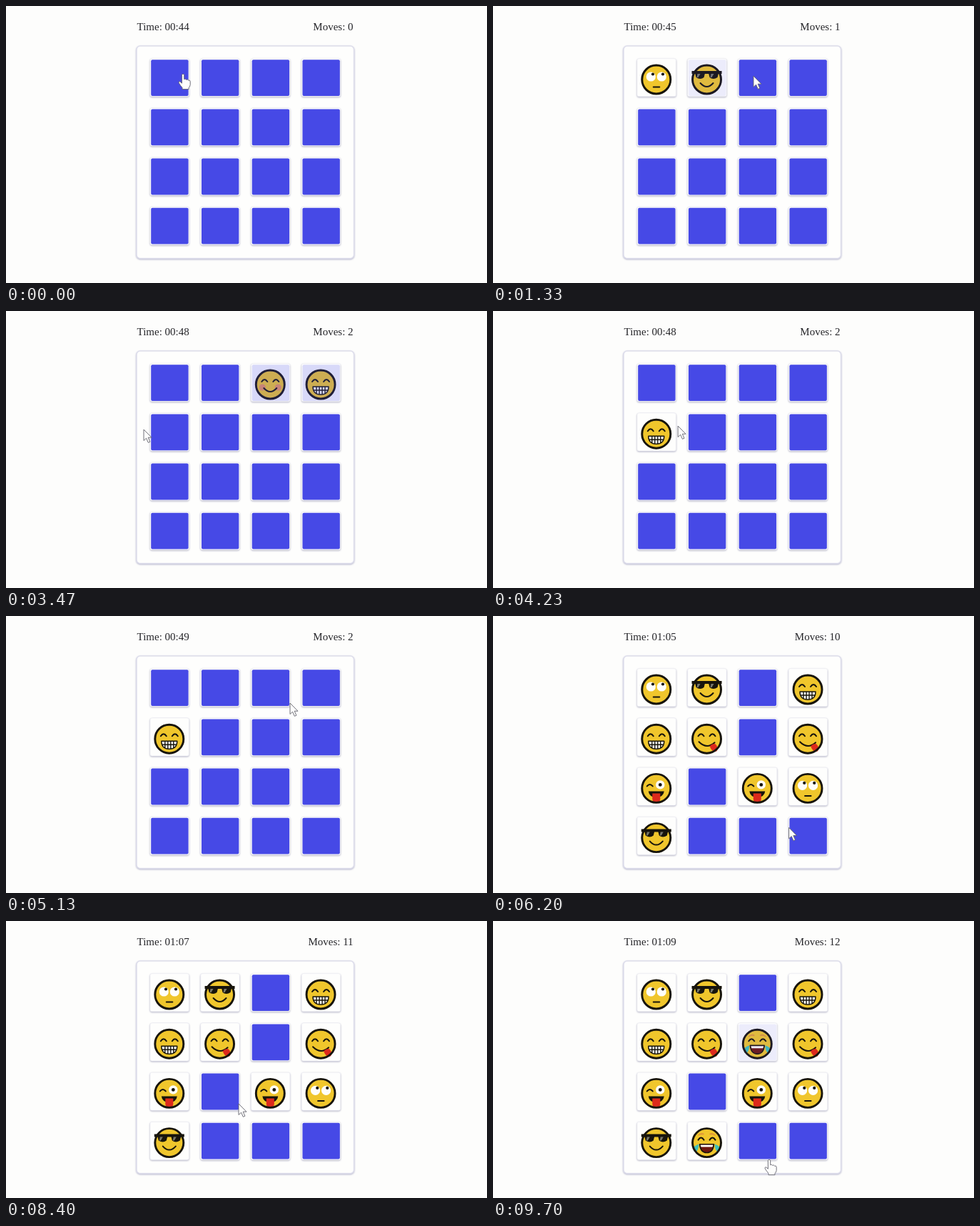
Recreate the animation shown at these times as an HTML page. Size 674 by 388 pixels, loop 9730 ms.

```html
<!DOCTYPE html>
<html lang="en">
<head>
<meta charset="utf-8">
<title>Memory game</title>
<style>
html, body { margin: 0; width: 100%; height: 100%; overflow: hidden; background: #fdfdfc; }
svg { display: block; width: 674px; height: 388px; }
text { font: 15px "Liberation Serif", serif; fill: #26262a; }
.board { fill: #fefefd; stroke: #dedeec; stroke-width: 1.5; filter: drop-shadow(0 1.3px 1.2px #b4b4cc); }
.card { fill: #fefefd; stroke: #ededf4; stroke-width: .6; filter: drop-shadow(0 1.2px 1.2px #b0b0c4); }
.line { fill: none; stroke: #17140c; stroke-width: 2; stroke-linecap: round; stroke-linejoin: round; }
.thin { stroke-width: 1.4; }
</style>
</head>
<body>
<svg viewBox="0 0 674 388">
  <rect width="674" height="388" fill="#fdfdfc"/>
  <text id="time" x="183.5" y="34"></text>
  <text id="moves" x="486.6" y="34" text-anchor="end"></text>
  <rect class="board" x="183" y="56" width="304.5" height="297.5" rx="5"/>
  <g id="cards"></g>
  <g id="cursor" fill="#fefefd" stroke="#62626c" stroke-width=".9" stroke-linejoin="round">
    <path id="arrow" d="M0 0V15.5L3.6 12.2L6.3 18.3L8.9 17.2L6.2 11.2H11Z"/>
    <path id="hand" d="M-1.6 1.2Q0 -1 1.7 1.2V7.6Q3.6 6.4 4.7 8.3Q6.6 7.2 7.6 9.1Q10 8.3 10.2 10.8V15.3Q9.6 18.3 8 19.6V21.6H-1V19.4Q-3.8 16.4 -5.8 12.7Q-6.4 10.6 -4.2 10.8L-1.6 13.2Z"/>
  </g>
</svg>
<script>
const LOOP = 9730, CUT = 6000, FADE = 300, WAIT = 820, LAG = 60;
const INK = '#17140c', WHITE = '#fefefa';
const $ = id => document.getElementById(id);

// Faces, drawn around (0, 0)
const line = (d, cls = '') => `<path class="line ${cls}" d="${d}"/>`;
const shape = (d, fill) => `<path d="${d}" fill="${fill}"/>`;
const dot = (x, y, r, fill) => `<circle cx="${x}" cy="${y}" r="${r}" fill="${fill}"/>`;
const both = part => part + `<g transform="scale(-1 1)">${part}</g>`;
const eyes = both(line('M4 -4Q8 -10 12 -4'));
const smile = line('M-9 5Q0 15 9 5');
const grin = 'M-11 3H11Q11 14 0 14Q-11 14 -11 3Z';
const laugh = 'M-10 2H10Q9 14 0 14Q-9 14 -10 2Z';

const faces = {
  roll: both(dot(7.5, -4, 6.6, WHITE)) + dot(-4.8, -7.5, 2.1, INK) + dot(9.2, -7.5, 2.1, INK) + line('M-4 10.5H4.5'),
  cool: shape('M-21 -12H21V-8H-21Z', INK) + both(shape('M2 -11H17L15 -3Q9 1 4 -3Z', INK)) +
    shape('M-13 -8H-9L-12 -3H-14ZM6 -8H10L7 -3H5Z', '#77776c') + smile,
  blush: both(dot(11, 4, 4.6, '#e8925c')) + eyes + smile,
  grin: eyes + shape(grin, WHITE) + line(grin + 'M-10 8H10M-6 3V12M-2 3V14M2 3V14M6 3V12', 'thin'),
  yum: eyes + line('M-11 4Q0 15 11 5') + shape('M4 10Q8 6 12 7Q17 12 14 17Q8 20 4 10Z', '#dc2a1c'),
  wink: line('M-13 -3Q-9 -8 -5 -3') + dot(5.5, -5, 6.2, WHITE) + dot(5.5, -5, 2.4, INK) +
    shape('M-11 4H11Q10 12 0 13Q-10 12 -11 4Z', INK) +
    shape('M-5.5 7H5.5V15Q5 20 0 20Q-5 20 -5.5 15Z', '#dc2a1c'),
  joy: both(shape('M4 -13Q9 -15 13 -10L11 -10Q8 -12 4 -11Z', '#e0963a')) + eyes +
    shape(laugh, '#6e1710') + shape('M-9 3H9L8 6H-8Z', WHITE) + line(laugh, 'thin') +
    both(shape('M11 2Q21 5 18 12Q12 15 11 2Z', '#3fc0bb'))
};
const deck = ['roll', 'cool', 'blush', 'grin', 'grin', 'yum', 'joy', 'yum',
  'wink', '', 'wink', 'roll', 'cool', 'joy', '', 'blush'];

const left = i => 202 + (i % 4) * 70.75;
const top_ = i => 73.8 + (i >> 2) * 69.2;
const center = i => [left(i) + 27, top_(i) + 26.5];

$('cards').innerHTML = deck.map((name, i) => {
  const face = name && dot(0, 0, 20, '#f0c62c') + faces[name] +
    `<circle r="20" fill="none" stroke="${INK}" stroke-width="2.9"/>`;
  return `<g transform="translate(${left(i)} ${top_(i)})">
    <rect class="card" width="54.4" height="53" rx="2.5"/>
    <g class="face" transform="translate(26.8 29.2)">${face}</g>
    <rect class="cover" x="1.2" y="1.4" width="52.4" height="50.8" rx="2" fill="#4649e6"/></g>`;
}).join('');
const covers = [...document.querySelectorAll('.cover')];
const fronts = [...document.querySelectorAll('.face')];

// Two stretches of play: clicks are [time, card], stops are [time, x, y]
const early = play({
  from: 0, seconds: 44, lead: 600, moves: 0, solved: [],
  clicks: [[300, 0], [1060, 1], [2050, 2], [2590, 3], [3900, 4], [5480, 3]],
  stops: [[0, 248, 95], [1330, 365, 98], [3470, 193, 166], [5130, 398, 122]]
});
const late = play({
  from: CUT, seconds: 65, lead: 450, moves: 10, solved: [0, 1, 3, 4, 5, 7, 8, 10, 11, 12],
  clicks: [[6500, 15], [7280, 6], [8750, 13], [9430, 6]],
  stops: [[CUT, 400, 290], [7230, 350, 156], [8400, 326, 256], [9700, 387, 334]]
});

// Every second click is a move; cards that differ close again after a wait
function play(scene) {
  scene.shows = scene.solved.map(card => ({ card, open: -FADE, close: Infinity }));
  scene.turns = [];
  scene.clicks.forEach(([t, card], n) => {
    scene.shows.push({ card, open: t, close: Infinity });
    if (n % 2 === 0) return;
    const pair = scene.shows.slice(-2);
    const match = deck[pair[0].card] === deck[card];
    if (!match) pair.forEach(s => { s.close = t + WAIT; });
    scene.turns.push({ t, end: match ? t : t + WAIT });
  });
  scene.path = scene.clicks.map(([t, card]) => [t, ...center(card)])
    .concat(scene.stops).sort((a, b) => a[0] - b[0]);
  return scene;
}

const clamp = v => Math.max(0, Math.min(1, v));
const pad = n => String(n).padStart(2, '0');

function shown(scene, card, t) {
  return Math.max(0, ...scene.shows.filter(s => s.card === card)
    .map(s => clamp((t - s.open) / FADE) - clamp((t - s.close) / FADE)));
}

function pointer({ path }, t) {
  const n = Math.max(0, path.findLastIndex(p => p[0] <= t));
  const a = path[n], b = path[n + 1] || a;
  const u = clamp((t - a[0]) / (b[0] - a[0] || 1)), e = u * u * (3 - 2 * u);
  return [a[1] + (b[1] - a[1]) * e, a[2] + (b[2] - a[2]) * e];
}

// The hand shows over a closed card unless the game waits for a pair to close
function canClick(scene, t) {
  if (scene.turns.some(m => t >= m.t && t < m.end)) return false;
  const [x, y] = pointer(scene, t);
  return deck.some((_, i) => {
    const [cx, cy] = center(i);
    return Math.abs(x - cx) < 25.2 && Math.abs(y - cy) < 25.2 && shown(scene, i, t) < .5;
  });
}

function draw(t) {
  const scene = t < CUT ? early : late;
  const s = scene.seconds + Math.floor((t - scene.from + scene.lead) / 1000);
  $('time').textContent = `Time: ${pad(Math.floor(s / 60))}:${pad(s % 60)}`;
  $('moves').textContent = `Moves: ${scene.moves + scene.turns.filter(m => m.t <= t).length}`;
  covers.forEach((cover, i) => {
    const v = shown(scene, i, t);
    cover.setAttribute('opacity', 1 - v);
    fronts[i].setAttribute('visibility', v > 0 ? 'visible' : 'hidden');
  });
  const hand = canClick(scene, t - LAG);
  $('cursor').setAttribute('transform', `translate(${pointer(scene, t).join(' ')})`);
  $('hand').setAttribute('visibility', hand ? 'visible' : 'hidden');
  $('arrow').setAttribute('visibility', hand ? 'hidden' : 'visible');
}

const start = performance.now();
function tick() {
  draw((performance.now() - start) % LOOP);
  requestAnimationFrame(tick);
}
draw(0);
requestAnimationFrame(tick);
</script>
</body>
</html>
```
